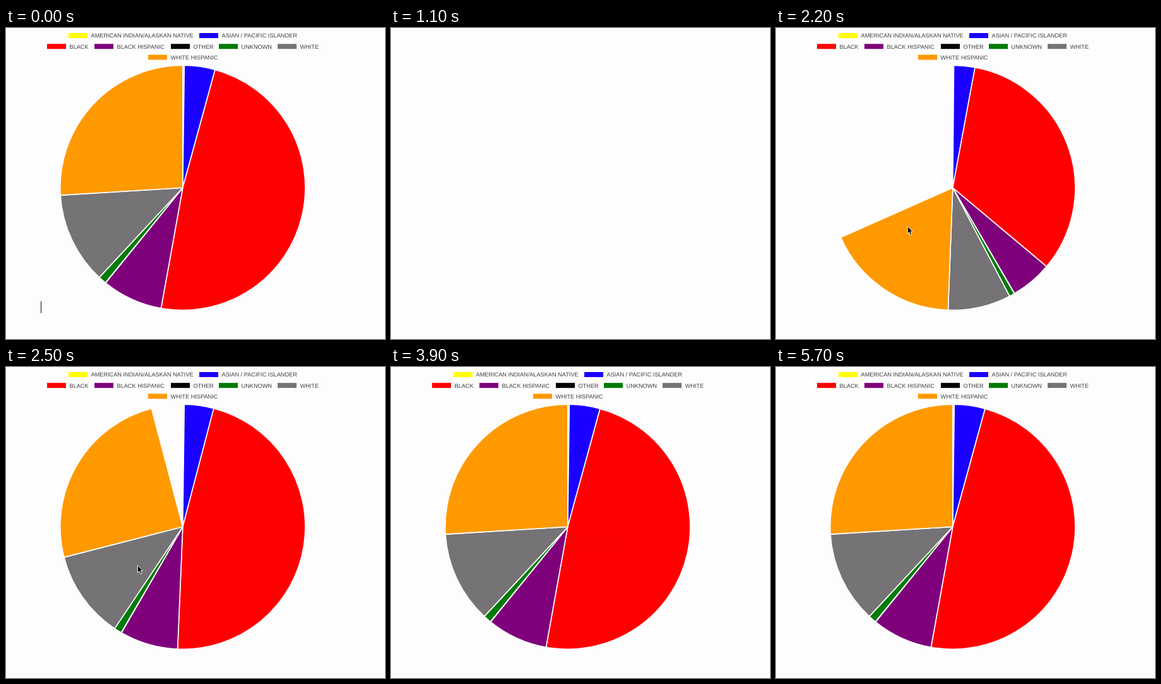
These frames come from a looping animation (600 px wide and 493 px high, 5800 ms). An HTML page:

```html
<!DOCTYPE html>
<html lang="en">
<head>
<meta charset="utf-8">
<title>Pie chart</title>
<style>
  html, body { margin: 0; width: 100%; height: 100%; overflow: hidden; background: #fefdfe; }
  svg { display: block; width: 600px; height: 493px; }
  text { font: 9.2px "Liberation Sans", Arial, sans-serif; fill: #404040; text-rendering: geometricPrecision; }
</style>
</head>
<body>
<svg viewBox="0 0 600 493">
  <g id="chart">
    <g id="legend"></g>
    <g id="pie" stroke="#fff" stroke-width="1.6" stroke-linejoin="bevel"></g>
    <rect id="tooltip" x="272" y="269" width="92" height="19" rx="4"/>
  </g>
  <path id="caret" d="M55.5 433V452" stroke="#111"/>
  <path id="cursor" d="M0 0V11.6L2.7 9.2L4.6 13.6L6.7 12.7L4.8 8.4H8.3Z" fill="#000" stroke="#fff" stroke-width=".9"/>
</svg>
<script>
const LOOP = 5800, STEP = 100;
const CX = 279.8, CY = 253.3, R = 194;
const CLEAR = 1100, LOADED = 2000;      // page is blank in between
const DRAW_START = 1950, DRAW_TIME = 1000;
const FADE_START = 3650, FADE_TIME = 400;
const BLINK = 500;

// label, colour, end angle in degrees, legend x, legend row
const slices = [
  ["AMERICAN INDIAN/ALASKAN NATIVE", "#ffff00", 0.75, 99, 0],
  ["ASIAN / PACIFIC ISLANDER", "#1a00ff", 15.3, 306, 0],
  ["BLACK", "#ff0000", 190.2, 65, 1],
  ["BLACK HISPANIC", "#7f007b", 219, 140, 1],
  ["OTHER", "#000000", 219.15, 261, 1],
  ["UNKNOWN", "#007a06", 222.9, 337, 1],
  ["WHITE", "#767376", 266.5, 430, 1],
  ["WHITE HISPANIC", "#ff9900", 360, 225, 2]
];

const $ = id => document.getElementById(id);
const clamp = v => Math.max(0, Math.min(1, v));
const easeOut = p => 1 - (1 - p) ** 4;

function add(parent, tag, attrs) {
  const el = document.createElementNS(parent.namespaceURI, tag);
  for (const key in attrs) el.setAttribute(key, attrs[key]);
  return parent.appendChild(el);
}

const arcs = slices.map(([label, fill, , x, row]) => {
  const y = 12 + row * 17.2;
  add($("legend"), "rect", { x, y: y - 4, width: 30, height: 8, fill });
  add($("legend"), "text", { x: x + 35.5, y: y + 3.3 }).textContent = label;
  return add($("pie"), "path", { fill });
});

function rim(deg) {
  const a = deg * Math.PI / 180;
  return `${CX + R * Math.sin(a)} ${CY - R * Math.cos(a)}`;
}

function drawPie(part) {
  let from = 0;
  arcs.forEach((arc, i) => {
    const to = slices[i][2] * part;
    arc.setAttribute("d", `M${CX} ${CY}L${rim(from)}A${R} ${R} 0 0 1 ${rim(to)}Z`);
    from = to;
  });
}

function show(id, on) {
  $(id).style.display = on ? "" : "none";
}

// The pointer glides in from the upper left, rests, then sweeps off to the right.
function placeCursor(t) {
  const before = Math.max(0, 1500 - t), after = Math.max(0, t - 3570);
  const x = 208.3 - 0.868 * before + 3.2 * after;
  const y = 314.5 - 0.72 * before;
  $("cursor").setAttribute("transform", `translate(${x} ${y})`);
  show("cursor", t >= 1400 && x < 600);
}

function render(t) {
  drawPie(t < LOADED ? 1 : easeOut(clamp((t - DRAW_START) / DRAW_TIME)));
  show("chart", t < CLEAR || t >= LOADED);
  show("caret", t < CLEAR && (t + 100) % (2 * BLINK) < BLINK);
  placeCursor(t);
  const fade = t < FADE_START ? 1 : easeOut(clamp((t - FADE_START) / FADE_TIME));
  $("tooltip").setAttribute("opacity", 0.8 * (1 - fade));
}

const start = performance.now();
function tick() {
  const t = (performance.now() - start) % LOOP;
  render(Math.floor(t / STEP) * STEP);
  requestAnimationFrame(tick);
}
tick();
</script>
</body>
</html>
```
